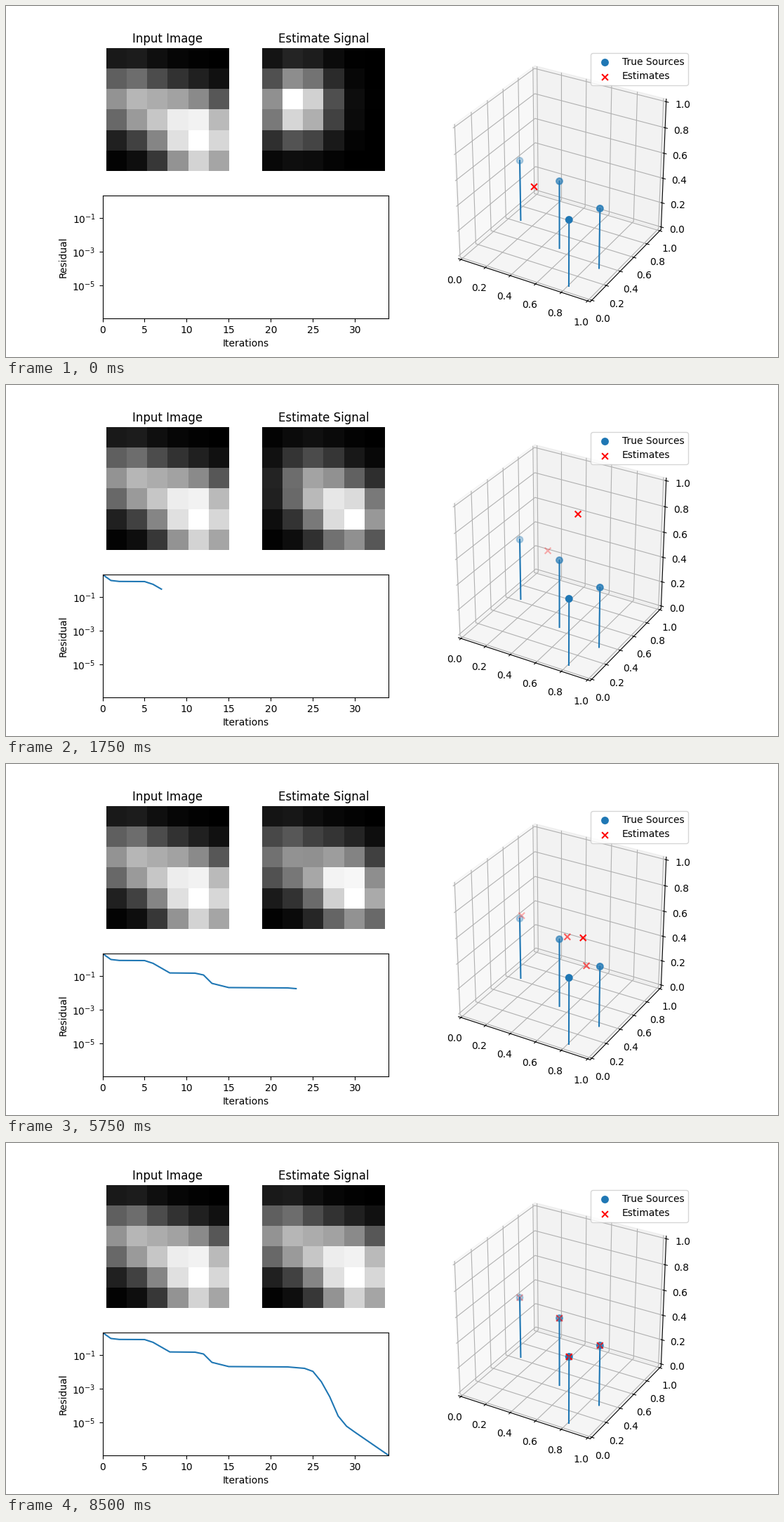
These frames come from a looping animation (1100x500 px, 8750 ms). A matplotlib script:

```python
import numpy as np
import matplotlib.pyplot as plt
from matplotlib.animation import FuncAnimation

FRAMES = 35
SIZE = 6            # pixels per side of the sensor
SPREAD = 2.6        # twice the variance of one blurred spot
MARK = dict(s=40, linewidths=1.5)

# Each spike: first iteration, then its stops; the last stop is a true source
TRACKS = [(born, np.array(stops)) for born, stops in (
    (0, [(.248, .546, .349), (.711, .3, .579), (.774, .24, 1.04),
         (.811, .22, 1.06), (.846, .19, .767), (.836, .08, .592),
         (.822, .042, .52)]),
    (6, [(.44, .51, .5), (.381, .52, .518), (.315, .52, .555),
         (.6, .42, .581), (.483, .41, .448), (.533, .416, .539)]),
    (12, [(-.02, .55, .337), (.128, .59, .528), (.107, .6, .466),
          (.105, .6, .49)]),
    (23, [(.75, .4, .4), (.838, .34, .502), (.893, .333, .475)]),
)]
SOURCES = np.array([stops[-1] for _, stops in TRACKS])

# Residual as (iteration, log10)
LOG_KEYS = np.array([
    (0, .328), (1, -.024), (2, -.08), (5, -.087), (6, -.25), (8, -.82),
    (11, -.834), (12, -.94), (13, -1.436), (15, -1.685), (22, -1.706),
    (24, -1.79), (25, -1.97), (26, -2.58), (27, -3.47), (28, -4.61),
    (29, -5.215), (30, -5.57), (34, -6.94),
])
STEPS = np.arange(FRAMES)
LOG_RES = np.interp(STEPS, *LOG_KEYS.T)

# The drop of the residual drives the spikes from stop to stop
LEVELS = [-.328, .087, .535, .94, 1.694, 2.58, 4.6]
LAST = len(LEVELS) - 1
STAGE = np.interp(-LOG_RES, LEVELS, range(LAST + 1))


def spikes(k):
    """Rows of x, y, z, amplitude for the spikes alive at iteration k."""
    rows = []
    for born, stops in TRACKS:
        if k < born:
            continue
        times = np.arange(LAST + 1)[-len(stops):]
        if born:
            amp = .62 * min(1, .45 + .55 * (k - born))
        else:
            amp = np.interp(STAGE[k], [3, 5], [1, .62])
        rows.append([np.interp(STAGE[k], times, c) for c in stops.T] + [amp])
    return np.array(rows)


def signal(k):
    """Blurred picture of the spikes, scaled to 0..1."""
    n = np.arange(SIZE)
    img = np.zeros((SIZE, SIZE))
    for x, y, _, amp in spikes(k):
        across = np.exp(-(n - (SIZE - 1) * x) ** 2 / SPREAD)
        down = np.exp(-(n - (SIZE - 1) * (1 - y)) ** 2 / SPREAD)
        img += amp * np.outer(down, across)
    img -= img.min()
    img /= img.max()
    lift = .65 * max(0, STAGE[k] - 4) / 2
    return img + lift * img ** 2 * (1 - img)


def show_image(cell, title, data):
    ax = fig.add_subplot(cell)
    ax.set_title(title)
    ax.axis("off")
    return ax.imshow(data, cmap="gray", vmin=0, vmax=1,
                     interpolation="nearest")


fig = plt.figure(figsize=(11, 5), dpi=100)
grid = fig.add_gridspec(2, 4)

show_image(grid[0, 0], "Input Image", signal(FRAMES - 1))
estimate = show_image(grid[0, 1], "Estimate Signal", signal(0))

res = fig.add_subplot(grid[1, :2])
curve, = res.plot([], [], color="C0")
handles = [
    res.scatter([], [], color="C0", label="True Sources", **MARK),
    res.scatter([], [], color="r", marker="x", label="Estimates", **MARK),
]
res.set_yscale("log")
res.set_xlim(0, FRAMES - 1)
res.set_ylim(10 ** LOG_RES[-1], 10 ** LOG_RES[0])
res.set_xticks(range(0, FRAMES, 5))
res.set_yticks([1e-5, 1e-3, 1e-1])
res.minorticks_off()
res.set_xlabel("Iterations")
res.set_ylabel("Residual")

space = fig.add_subplot(grid[:, 2:], projection="3d", computed_zorder=False)
space.set_box_aspect((1, 1, 1), zoom=.94676)
span = (-1 / 48, 49 / 48)
space.set(xlim=span, ylim=span, zlim=span)
space.scatter(*SOURCES.T, color="C0", **MARK)
for x, y, z in SOURCES:
    space.plot([x, x], [y, y], [0, z], color="C0")
space.legend(handles=handles, loc="upper right")

crosses = []


def update(k):
    while crosses:
        crosses.pop().remove()
    x, y, z, _ = spikes(k).T
    crosses.append(space.scatter(x, y, z, color="r", marker="x", **MARK))
    estimate.set_data(signal(k))
    curve.set_data(STEPS[:k + 1], 10 ** LOG_RES[:k + 1])
    return [estimate, curve, *crosses]


anim = FuncAnimation(fig, update, frames=FRAMES, interval=250, repeat=True)
plt.show()
```
